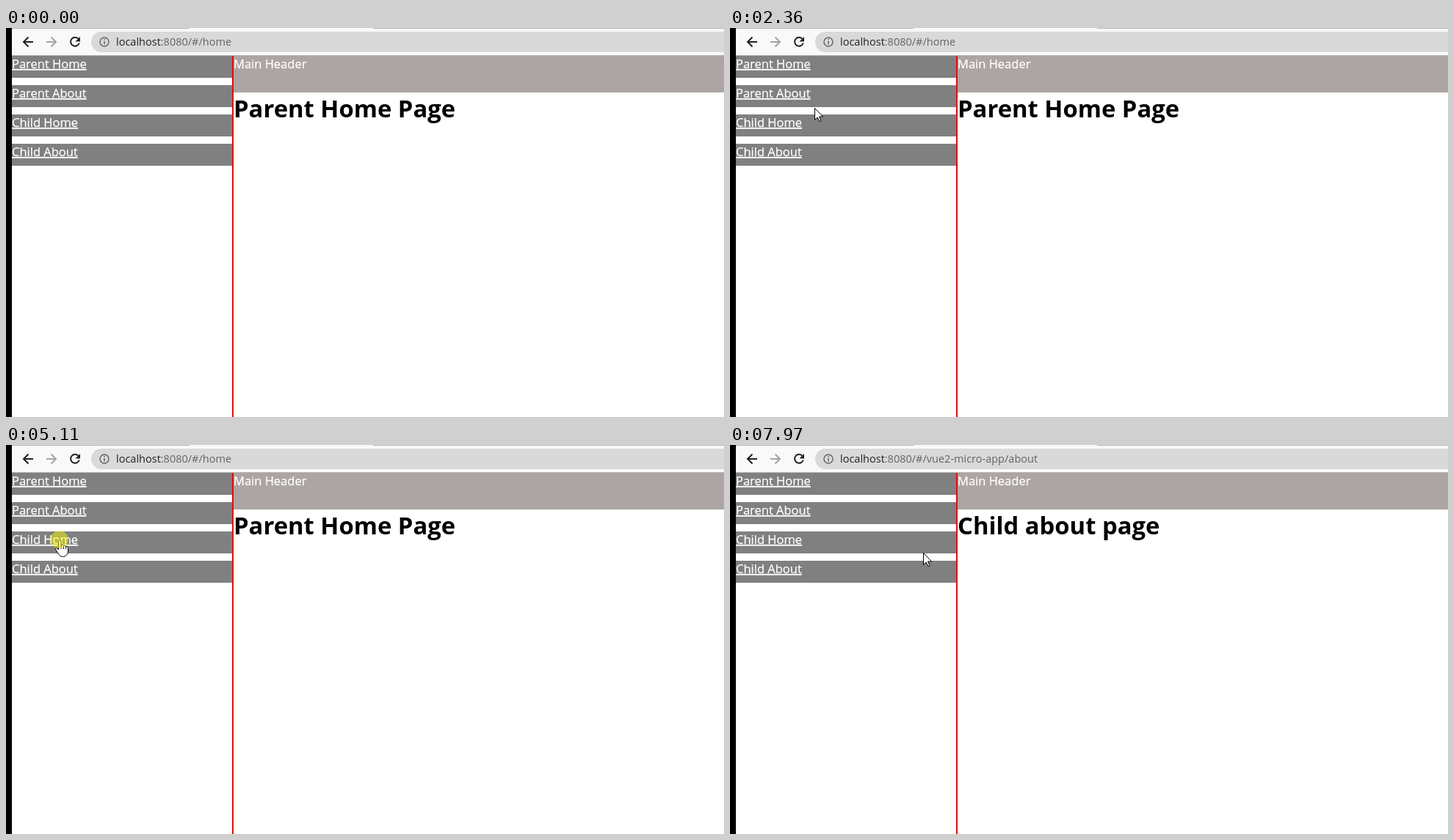
These frames come from a looping animation (978x531 px, 8000 ms). An HTML page:

```html
<!DOCTYPE html>
<html lang="en">
<head>
<meta charset="utf-8">
<title>Parent and child pages</title>
<style>
  html, body { margin: 0; width: 100%; height: 100%; overflow: hidden; background: #fff; }
  svg { display: block; width: 100%; height: 100%; }
  text { font-family: "Open Sans", "Noto Sans", sans-serif; white-space: pre; }
  .link, .label { font-size: 16.5px; fill: #fff; stroke: #fff; stroke-width: .25; }
  .link { text-decoration: underline 1px; text-underline-offset: 2px; }
  .url { font-size: 14.5px; fill: #5f6368; }
  .host { fill: #202124; }
  .title { font-size: 32.8px; font-weight: 700; fill: #000; }
  .icon { fill: none; stroke: #202124; stroke-width: 2; }
  .cursor { fill: #fff; stroke: #000; stroke-width: 1; stroke-linejoin: round; }
</style>
</head>
<body>
<svg viewBox="0 0 978 531" preserveAspectRatio="none">
  <rect width="978" height="531" fill="#fff"/>

  <!-- browser bar -->
  <rect width="978" height="37" fill="#f9f9fa"/>
  <path d="M8 .5H250M500 .5H978M8 37.5H978" stroke="#b6b4b6"/>
  <rect x="116" y="5" width="900" height="28" rx="14" fill="#d9d9d9"/>
  <path class="icon" d="M37 19H24.5M30.5 12.5L24 19l6.5 6.5"/>
  <path class="icon" d="M55 19H67.5M61.5 12.5L68 19l-6.5 6.5" style="stroke:#a2a3a6"/>
  <path class="icon" d="M98.8 15A6 6 0 1 0 99.8 20.5"/>
  <path d="M101 12v6.5h-6.5z" fill="#202124"/>
  <circle cx="134" cy="19" r="6" fill="none" stroke="#5f6368" stroke-width="1.4"/>
  <path d="M134 18v4.5M134 15v1.6" stroke="#5f6368" stroke-width="1.5"/>
  <text class="url" x="150" y="24"><tspan class="host">localhost</tspan><tspan>:8080/#</tspan><tspan id="path"></tspan></text>

  <!-- page -->
  <g id="menu"></g>
  <rect x="310" y="38" width="668" height="50" fill="#ada4a4"/>
  <text class="label" x="310" y="55">Main Header</text>
  <rect x="308" y="38" width="2" height="493" fill="#f00"/>
  <text class="title" id="title" x="310" y="122"></text>
  <rect id="bar" x="8" y="38" width="0" height="2" fill="#29d"/>
  <rect width="8" height="531" fill="#000"/>

  <g id="pointer" class="cursor">
    <path id="arrow" d="M.5 .5V16.5L4.2 13 6.8 18.6 9 17.6 6.5 12H11.5Z"/>
    <g id="hand">
      <path d="M-1.5 14V2Q-1.5 .5 .2 .5T2 2V8.5Q2 7 3.6 7.2T5.3 9Q5.5 7.9 7 8.2T8.6 10Q9 9.2 10.2 9.6T11.5 11.5V16Q11.5 18.5 10 20.5 8.5 23.5 4.5 23.5 .5 23.5-1 20.5L-5.2 14Q-6 11.8-4.3 11.5-3 11.5-1.5 14Z"/>
      <path d="M2 8.5V13M5.3 9V13M8.6 10V13" fill="none"/>
    </g>
    <circle id="press" r="12" fill="#ff0" fill-opacity=".47" stroke="none"/>
  </g>
</svg>
<script>
const LOOP = 8000, TICK = 76, HOLD = 70;
const TOP = 38, LEFT = 8, ROW = 40;
const LOAD = 5570, READY = 5650;
const CHILD = '/vue2-micro-app';
const $ = id => document.getElementById(id);

const pages = [
  { link: 'Parent Home', path: '/home', title: 'Parent Home Page' },
  { link: 'Parent About', path: '/about', title: 'Parent About Page' },
  { link: 'Child Home', path: CHILD + '/home', title: 'Child home page' },
  { link: 'Child About', path: CHILD + '/about', title: 'Child about page' }
];
const [HOME, ABOUT, CHILD_HOME, CHILD_ABOUT] = pages;

$('menu').innerHTML = pages.map(({ link }, i) =>
  `<rect x="${LEFT}" y="${TOP + ROW * i}" width="300" height="30" fill="#808080"/>` +
  `<text class="link" x="${LEFT}" y="${TOP + 17 + ROW * i}">${link}</text>`).join('');
const labels = [...document.querySelectorAll('.link')];

// where the pointer heads: start time, ticks on the way, end point
const ENTRY = [1002, 514];
const moves = [
  [190, 7, [147, 60]],
  [740, 4, [80, 74]],
  [1050, 6, [64, 131]],
  [2360, 1, [115, 109]],
  [2530, 5, [67, 85]],
  [3530, 5, [71, 47]],
  [4560, 6, [73, 129]],
  [LOAD, 4, [78, 145]],
  [5880, 5, [75, 169]],
  [7590, 6, [263, 147]]
];
const clicks = [[3000, ABOUT], [4180, HOME], [5110, CHILD_HOME], [6830, CHILD_ABOUT]];

const clamp = v => Math.max(0, Math.min(1, v));
const ease = u => u * u * (3 - 2 * u);
const mix = (a, b, u) => Math.round(a + (b - a) * u);
const show = (id, on) => $(id).setAttribute('visibility', on ? 'visible' : 'hidden');

// the height runs ahead of the sideways motion, which bends the path
function pointerAt(t) {
  let [x, y] = ENTRY;
  for (const [start, ticks, end] of moves) {
    if (t < start) break;
    const u = ease(clamp((Math.floor((t - start) / TICK) + 1) / ticks));
    x = mix(x, end[0], u);
    y = mix(y, end[1], u ** 0.7);
  }
  return [x, y];
}

function overLink(x, y) {
  const label = labels[Math.floor((y - TOP) / ROW)];
  return !!label && x < LEFT + label.getComputedTextLength() && (y - TOP) % ROW < 23;
}

function pageAt(t) {
  const last = clicks.filter(([at]) => t >= at + HOLD).pop();
  const page = last ? last[1] : HOME;
  return page === CHILD_HOME && t < READY ? { path: CHILD, title: '' } : page;
}

function drawBar(t) {
  const step = Math.floor((t - LOAD) / TICK);
  const part = step < 1 ? 0 : 0.08 + 0.92 * ease(clamp((step - 1) / 6.5));
  $('bar').setAttribute('width', 970 * part);
  $('bar').setAttribute('opacity', 1 - clamp((t - LOAD - 530) / 100));
}

function draw(t) {
  const [x, y] = pointerAt(t);
  const hand = overLink(x, y);
  $('pointer').setAttribute('transform', `translate(${x} ${y})`);
  show('hand', hand);
  show('arrow', !hand);
  show('press', clicks.some(([at]) => t >= at && t < at + HOLD));

  const { path, title } = pageAt(t);
  $('path').textContent = path;
  $('title').textContent = title;
  drawBar(t);
}

const begin = performance.now();
function frame() {
  draw((performance.now() - begin) % LOOP);
  requestAnimationFrame(frame);
}
frame();
</script>
</body>
</html>
```
